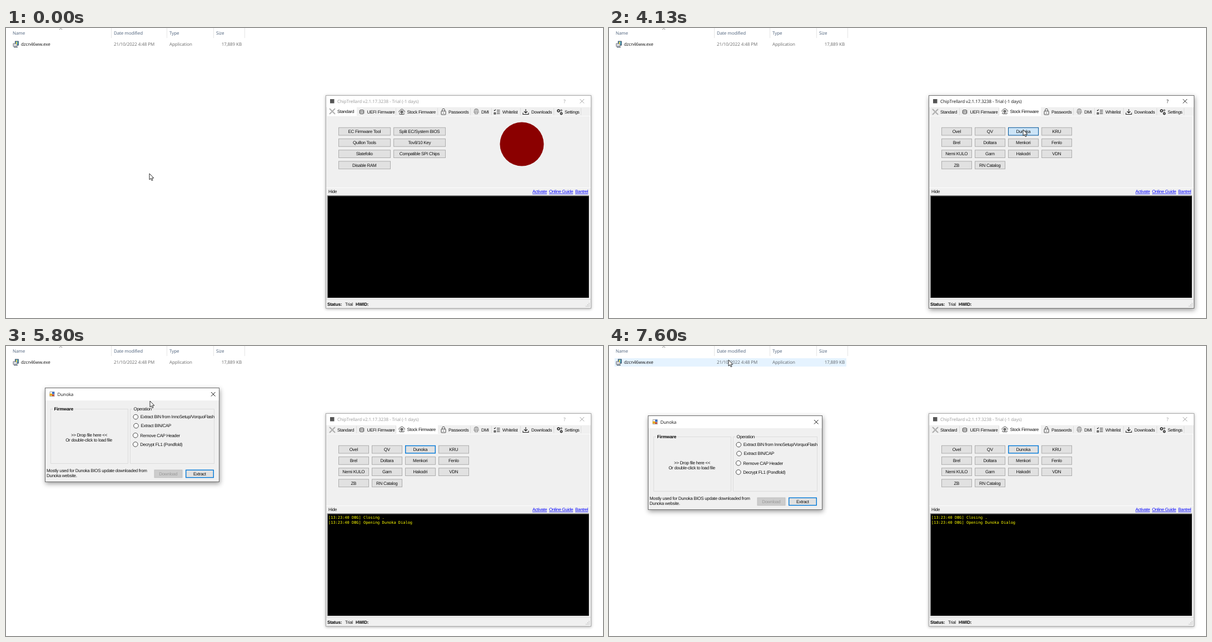
An HTML page that plays this animation: 1074x522 px, repeating every 8000 ms.

```html
<!DOCTYPE html>
<html lang="en">
<head>
<meta charset="utf-8">
<title>Firmware tool</title>
<style>
html, body { margin: 0; width: 100%; height: 100%; overflow: hidden; background: #fff; }
svg { display: block; width: 1074px; height: 522px; }
text { font: 8px "Liberation Sans", Arial, sans-serif; letter-spacing: -.3px; fill: #111; white-space: pre; text-rendering: geometricPrecision; }
.ui { font: 8px "Open Sans", "Noto Sans", sans-serif; letter-spacing: -.08px; }
.bold { font-weight: bold; letter-spacing: -.12px; fill: #000; }
.link { fill: #00f; text-decoration: underline; }
.log { font: 6.97px "DejaVu Sans Mono", "Noto Sans Mono", monospace; letter-spacing: 0; fill: #ff0; }
.active { filter: drop-shadow(1px 3px 4.5px rgba(0, 0, 0, .4)); }
.idle { filter: drop-shadow(.5px 1px 2.5px rgba(0, 0, 0, .32)); }
</style>
</head>
<body>
<svg id="stage" viewBox="0 0 1074 522"></svg>
<script>
const LOOP = 8000, STEP = 1000 / 15;
const stage = document.getElementById('stage');
const BRAND = 'Dunoka';

// Steps are fifteenths of a second
const CLICK_TAB = 27, PAINTED = 28, PRESS = 62, OPEN = 64;

// Each move: first step, last step, then the points it passes through
const cursorMoves = [
  [6, 19, 258, 262, 735, 151],
  [35, 38, 735, 151, 746, 176],
  [39, 43, 746, 176, 746, 186],
  [48, 57, 746, 186, 695, 228, 780, 150, 870, 130, 957, 201],
  [61, 62, 957, 201, 745, 183],
  [69, 76, 745, 183, 346, 101],
  [76, 83, 346, 101, 231, 88, 262, 63],
  [84, 90, 262, 63, 259, 99, 259, 142],
  [91, 97, 259, 142, 224, 117],
  [97, 110, 224, 117, 133, 28],
  [110, 114, 133, 28, 215, 25]
];
const dialogMoves = [[84, 91, 73, 47, 69.4, 84, 70, 126]];

const tabs = [
  ['Standard', 578, 631, 596, 587], ['UEFI Firmware', 631, 702, 649.5, 640],
  ['Stock Firmware', 702, 777, 721.5, 712], ['Passwords', 777, 836, 796, 787],
  ['DMI', 836, 874, 855, 846], ['Whitelist', 874, 926, 893, 883],
  ['Downloads', 926, 986, 945, 935], ['Settings', 986, 1035, 1005, 996]
];
const icons = [
  '<path d="M-5-5L5 5M5-5L-5 5" stroke="#777" stroke-width="1.6"/><path d="M-5-5L5 5M5-5L-5 5" stroke="#eee" stroke-width=".6"/>',
  '<rect x="-3" y="-3.5" width="6" height="7" rx="1"/><path d="M-4.5-2h1.5M-4.5 0h1.5M-4.5 2h1.5M3-2h1.5M3 0h1.5M3 2h1.5M-1.5-1.2h3M-1.5 1h3"/>',
  '<path d="M-4.5 1C-6-1-4-3-3-2.5C-2-6 3-5.5 3-2.5C5-3 6 0 4.5 1"/><circle cy="0" r="2.2"/><path d="M0-2V2M-2.2 0H2.2M0 2V4.5M-4 4.5H4M-3 2L-5 4M3 2L5 4"/>',
  '<rect x="-4" y="-1.5" width="8" height="6.5" rx=".6"/><path d="M-2.3-1.5V-3.5A2.3 2.3 0 0 1 2.3-3.5V-1.5M0 1V3"/>',
  '<g stroke="#777"><path d="M-4 2V-1A4 4 0 0 1 4-1V2M-2.5 4V-.5A2.5 2.5 0 0 1 2.5-.5V4M-1 4.8V0A1 1 0 0 1 1 0V4.8M-3.5-4A5 5 0 0 1 3.5-4"/></g>',
  '<path d="M-5-3L-4-2L-2-4.5M-4.8 1.5h2.5v2.5h-2.5zM0-3H5.5M0 0H5.5M0 3H5.5" stroke-width="1.1"/>',
  '<path d="M0-5V2M-3-1L0 2L3-1M-5 1.5V4.5H5V1.5" stroke-width="1.1"/>',
  '<circle cx="-2" cy="-2" r="2" stroke-width="1.5"/><circle cx="3" cy="-2.8" r="1.3"/><circle cx="3" cy="3" r="1.7" stroke-width="1.5"/>'
];
const tools = [
  ['EC Firmware Tool', 'Split EC/System BIOS'], ['Quillon Tools', 'Tov8/10 Key'],
  ['Slatefolio', 'Compatible SPI Chips'], ['Disable RAM']
];
const vendors = [
  ['Ovel', 'QV', BRAND, 'KRU'], ['Brel', 'Doltara', 'Menkori', 'Fenlo'],
  ['Nemi KULO', 'Garn', 'Hakodri', 'VDN'], ['ZB', 'RN Catalog']
];

const smooth = u => u * u * (3 - 2 * u);
const inside = (p, x, y, w, h) => p[0] >= x && p[0] < x + w && p[1] >= y && p[1] < y + h;

function follow(moves, step) {
  let move = moves[0];
  for (const m of moves) if (step > m[0]) move = m;
  const [from, to, ...pts] = move;
  const legs = pts.length / 2 - 1;
  const u = smooth(Math.min(1, Math.max(0, (step - from) / (to - from)))) * legs;
  const i = Math.min(legs - 1, Math.floor(u)), f = u - i;
  return [0, 1].map(k => Math.round(pts[2 * i + k] + (pts[2 * i + 2 + k] - pts[2 * i + k]) * f));
}

const rect = (x, y, w, h, fill, extra = '') =>
  `<rect x="${x}" y="${y}" width="${w}" height="${h}" fill="${fill}" ${extra}/>`;
const box = (x, y, w, h, fill, stroke, width = 1) =>
  rect(x + width / 2, y + width / 2, w - width, h - width, fill, `stroke="${stroke}" stroke-width="${width}"`);
const line = (d, stroke, width = 1) => `<path d="${d}" fill="none" stroke="${stroke}" stroke-width="${width}"/>`;
const text = (x, y, s, cls = '', extra = '') =>
  `<text x="${x}" y="${y}" class="${cls}" ${extra}>${s.replace(/</g, '&lt;').replace(/>/g, '&gt;')}</text>`;
const centred = (x, y, s, fill = '#111') => text(x, y, s, '', `text-anchor="middle" style="fill:${fill}"`);

const buttonLooks = {
  normal: ['#e1e1e1', '#adadad', 1], hover: ['#e5f1fb', '#0078d7', 1],
  pressed: ['#cce4f7', '#005499', 1], focus: ['#e1e1e1', '#0078d7', 1.4],
  off: ['#cccccc', '#bfbfbf', 1, '#9a9a9a']
};
function button(x, y, w, label, look = 'normal') {
  const [fill, stroke, width, ink] = buttonLooks[look];
  return box(x, y, w, 14.8, fill, stroke, width) + centred(x + w / 2 - .2, y + 10.2, label, ink);
}

function explorer(cursor) {
  let s = inside(cursor, 10, 22, 417, 15) ? rect(10, 22, 417, 15, '#e5f3ff') : '';
  s += line('M189.5 0V18M289.5 0V18M373.5 0V18M429.5 0V18', '#e5e5e5') + line('M96 3L98.5 .7L101 3', '#777', .9);
  [['Name', 12], ['Date modified', 194], ['Type', 294], ['Size', 378]].forEach(([label, x]) => {
    s += text(x, 12, label, 'ui', 'style="fill:#4c607a"');
  });
  s += text(27, 32, 'dzcn46ww.exe', 'ui');
  s += `<g style="opacity:.62">${text(194, 32, '21/10/2022 4:48 PM', 'ui')}${text(294, 32, 'Application', 'ui')}` +
    text(424, 32, '17,889 KB', 'ui', 'text-anchor="end"') + '</g>';
  return s + box(16, 23.5, 7, 8, '#4aa3c7', '#334', .8) + rect(13, 28, 7, 5, '#d9dde2', 'stroke="#445" stroke-width=".7"') +
    rect(18, 25, 2, 4, '#e8d44c') + line('M14 34.5H21', '#345');
}

function toolPage() {
  return tools.map((row, r) => row.map((label, c) => button(598 + 99 * c, 178.8 + 20.2 * r, 94, label)).join('')).join('');
}

function vendorLook(step, label, hovered) {
  if (label !== BRAND) return hovered ? 'hover' : 'normal';
  if (step >= PRESS && step < OPEN) return 'pressed';
  if (hovered) return 'hover';
  return step >= OPEN ? 'focus' : 'normal';
}

function vendorPage(step, cursor) {
  const rows = step < PAINTED ? 2 : 4;
  let s = '';
  if (rows === 2) s += toolPage() + [653, 713, 773].map(x => rect(x, 217, 5, 40, '#f0f0f0')).join('') + rect(597, 178, 240, 37, '#f0f0f0');
  vendors.slice(0, rows).forEach((row, r) => row.forEach((label, c) => {
    const x = 598 + 60 * c, y = 178.8 + 20.2 * r;
    s += button(x, y, 55, label, vendorLook(step, label, inside(cursor, x, y, 55, 15)));
  }));
  return s;
}

function tabStrip(selected, cursor) {
  let s = '';
  tabs.forEach(([label, x0, x1, tx, ix], i) => {
    const on = i === selected, y = on ? 150 : 151;
    if (on) s += rect(x0, 142, x1 - x0, 16, '#fff');
    else {
      if (inside(cursor, x0, 144, x1 - x0, 14)) s += rect(x0, 144, x1 - x0, 14, '#d8eaf9');
      s += line(`M${x1 - .5} 144V157`, '#dcdcdc');
    }
    s += `<g transform="translate(${ix} ${y})" fill="none" stroke="#222" stroke-width=".8">${icons[i]}</g>` +
      text(tx, y + 3, label);
  });
  return s;
}

// Sunken edge: grey above and left, light below and right
function logPanel(step) {
  let s = rect(577.6, 301.2, 472.4, 185.8, '#fff') + rect(577.6, 301.2, 471.4, 184.8, '#858585') + rect(579, 302.6, 469.4, 182.8, '#000');
  if (step >= OPEN) s += text(580, 311, '[13:23:40 DBG] Closing .', 'log') + text(580, 320, `[13:23:40 DBG] Opening ${BRAND} Dialog`, 'log');
  return s;
}

function mainWindow(step, cursor) {
  const stock = step >= CLICK_TAB, active = stock && step < OPEN, ink = active ? '#111' : '#999';
  let s = `<g class="${active ? 'active' : 'idle'}">${box(575, 121, 478, 384, '#f0f0f0', active ? '#707070' : '#aaaaaa')}</g>`;
  s += rect(576, 122, 476, 20.5, '#fff') + rect(583, 128, 7.5, 7.5, '#555');
  s += text(596, 134.8, 'ChipTrellard v2.1.17.3238 - Trial (-1 days)', 'ui', `style="fill:${ink}"`);
  s += text(1003, 135, '?', 'ui', `style="fill:${ink};font-size:8.5px"`) + line('M1032.5 128L1040 135.5M1040 128L1032.5 135.5', ink, .9);
  s += line('M578 158.5H1051M1050.5 158V287', '#fafafa') + line('M576 287.5H1052', '#fcfcfc');
  s += tabStrip(stock ? 2 : 0, cursor);
  s += stock ? vendorPage(step, cursor) : toolPage() + '<circle cx="928" cy="209" r="39.5" fill="#8b0000"/>';
  s += text(580, 297.3, 'Hide') + text(947, 297.3, 'Activate', 'link') + text(977, 297.3, 'Online Guide', 'link') + text(1024, 297.3, 'Bantrel', 'link');
  s += logPanel(step);
  s += line('M576 488.5H1052', '#dcdcdc') + text(578, 499.5, 'Status:', 'bold') + text(610, 499.5, 'Trial') + text(629, 499.5, 'HWID:', 'bold');
  for (let i = 0; i < 3; i++) for (let j = 0; j <= i; j++) s += rect(1048.5 - 2.6 * j, 495 + 2.6 * i, 1.2, 1.2, '#aaa');
  return s;
}

function group(x, w, label, cls, cover) {
  return box(x, 37, w, 99, 'none', '#dcdcdc') + rect(x + 5, 35, cover, 5, '#f0f0f0') + text(x + 6.5, 39.5, label, cls);
}

function dialog(step) {
  if (step < OPEN) return '';
  const [x, y] = follow(dialogMoves, step);
  let s = `<g transform="translate(${x} ${y})" opacity="${step === OPEN ? .5 : 1}">`;
  s += `<g class="active">${box(0, -1, 314, 170, '#f0f0f0', '#6b6b6b')}</g>` + rect(1, 0, 312, 22, '#fff');
  s += rect(9, 6.6, 8, 8, '#fff', 'stroke="#888" stroke-width=".8"') + rect(8.5, 9.6, 4.5, 4, '#e6a91c') + rect(13, 6.6, 4, 4, '#3b6fc4') + rect(13, 11.1, 3.5, 3, '#c9452f');
  s += text(22.5, 13.9, BRAND, 'ui') + line('M299 7L306.5 14.5M306.5 7L299 14.5', '#111');
  s += group(10, 140, 'Firmware', 'bold', 37) + group(153, 152, 'Operation', '', 34);
  s += centred(79.5, 86.6, '>> Drop file here <<') + centred(79, 95.6, 'Or double-click to load file');
  [['Extract BIN from InnoSetup/VorquoFlash', 51.6, .3], ['Extract BIN/CAP', 67.6, 1], ['Remove CAP Header', 84.8, -.2], ['Decrypt FL1 (Pondfold)', 101, -.2]]
    .forEach(([label, cy, dx]) => {
      s += `<circle cx="${163 + dx}" cy="${cy}" r="4.3" fill="#fff" stroke="#333" stroke-width=".9"/>` + text(171.5 + dx, cy + 2.8, label);
    });
  s += text(3, 151.4, `Mostly used for ${BRAND} BIOS update downloaded from`) + text(3, 160.4, `${BRAND} website.`);
  return s + button(196.5, 146.6, 51, 'Download', 'off') + button(253, 146.6, 51, 'Extract', 'focus') + '</g>';
}

function draw(step) {
  const cursor = follow(cursorMoves, step);
  return rect(0, 0, 1074, 522, '#fff') + explorer(cursor) + mainWindow(step, cursor) + dialog(step) +
    `<path transform="translate(${cursor[0]} ${cursor[1]})" d="M0 0V11L2.5 8.7L4.2 12.6L6 11.8L4.3 8.1H7.8Z" fill="#fff" stroke="#111" stroke-width=".9"/>`;
}

let shown = -1;
function tick() {
  const step = Math.floor((performance.now() % LOOP + 4) / STEP) % (LOOP / STEP);
  if (step !== shown) stage.innerHTML = draw(shown = step);
  requestAnimationFrame(tick);
}
tick();
</script>
</body>
</html>
```
